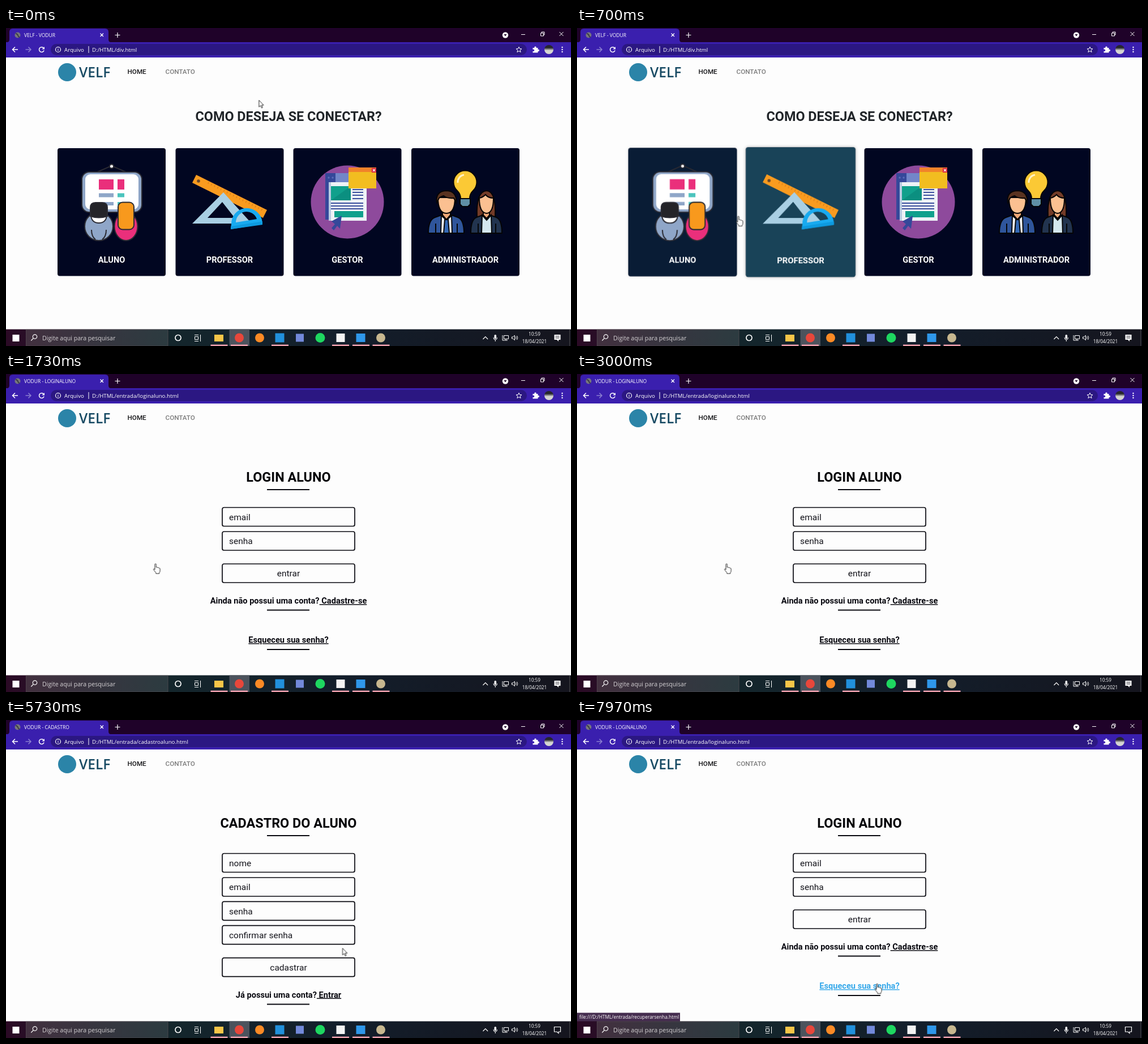
Write an HTML page that moves like this. It is 998 px wide and 561 px high and loops after 8000 ms.

```html
<!DOCTYPE html>
<html lang="pt-BR">
<head>
<meta charset="utf-8">
<title>Login</title>
<style>
html, body { margin: 0; width: 100%; height: 100%; overflow: hidden; background: #fdfdfd; }
svg { display: block; }
text { font-family: Roboto, sans-serif; white-space: pre; }
.ui text, .ui { font-family: "Open Sans", sans-serif; fill: #fff; }
.line { fill: none; stroke: #fff; stroke-width: 1.2; }
.mid { text-anchor: middle; }
.h { font-size: 23.4px; font-weight: 700; text-anchor: middle; fill: #050508; }
.label { font-size: 14.6px; font-weight: 700; text-anchor: middle; fill: #fff; }
.ask { font-size: 14.6px; font-weight: 700; text-anchor: middle; fill: #08080f; }
.in { font-size: 15.5px; fill: #15151c; }
.link { text-decoration: underline; }
.tab { font-size: 8.5px; }
.url { font-size: 9.7px; }
.status text { font-size: 8.4px; }

.home, .login, .signup, .badge, .quiet, .arrow, .hand { animation: 8s step-end infinite; }
.home { animation-name: home; }
.login { animation-name: login; }
.signup { animation-name: signup; }
.badge { animation-name: badge; }
.quiet { animation-name: quiet; }
.arrow { animation-name: arrow; }
.hand { animation-name: hand; }
@keyframes home { 0% { opacity: 1 } 21.25%, 100% { opacity: 0 } }
@keyframes login { 0% { opacity: 0 } 21.25% { opacity: 1 } 59% { opacity: 0 } 86%, 100% { opacity: 1 } }
@keyframes signup { 0% { opacity: 0 } 59% { opacity: 1 } 86%, 100% { opacity: 0 } }
@keyframes badge { 0% { opacity: 1 } 60%, 100% { opacity: 0 } }
@keyframes quiet { 0% { opacity: 0 } 60%, 100% { opacity: 1 } }
@keyframes arrow {
  0% { opacity: 1 } 3.1% { opacity: 0 } 7.7% { opacity: 1 } 8.5% { opacity: 0 }
  37.9% { opacity: 1 } 46% { opacity: 0 } 60% { opacity: 1 } 80.5% { opacity: 0 }
  88% { opacity: 1 } 94.4%, 100% { opacity: 0 }
}
@keyframes hand {
  0% { opacity: 0 } 3.1% { opacity: 1 } 7.7% { opacity: 0 } 8.5% { opacity: 1 }
  37.9% { opacity: 0 } 46% { opacity: 1 } 60% { opacity: 0 } 80.5% { opacity: 1 }
  88% { opacity: 0 } 94.4%, 100% { opacity: 1 }
}
.cursor { animation: move 8s linear infinite; }
@keyframes move {
  0% { transform: translate(447px, 127px) }
  3% { transform: translate(398px, 214px) }
  6.25% { transform: translate(334px, 320px) }
  8.5% { transform: translate(285px, 332px) }
  10.9%, 37.5% { transform: translate(261.5px, 335px); animation-timing-function: ease-in-out }
  47.5%, 71.6% { transform: translate(594.5px, 402.5px); animation-timing-function: ease-in-out }
  81.6%, 87.5% { transform: translate(571px, 482px); animation-timing-function: ease-in-out }
  93.6% { transform: translate(570px, 452px) }
  97.1%, 100% { transform: translate(527.5px, 465.5px) }
}

.card { transform-box: fill-box; transform-origin: center; }
.glow { fill: #5be0e4; opacity: 0; filter: drop-shadow(0 0 3px #100505); }
.teacher { animation: growTeacher 8s infinite; }
.teacher .glow { animation: glowTeacher 8s infinite; }
.student { animation: growStudent 8s infinite; }
.student .glow { animation: glowStudent 8s infinite; }
@keyframes growTeacher { 0%, 3.1% { transform: scale(1) } 5.6%, 7.7% { transform: scale(1.053) } 10.2%, 100% { transform: scale(1) } }
@keyframes glowTeacher { 0%, 3.1% { opacity: 0 } 5.6%, 7.7% { opacity: 1 } 10.2%, 100% { opacity: 0 } }
@keyframes growStudent { 0%, 8.5% { transform: scale(1) } 11%, 30% { transform: scale(1.053) } 30.1%, 100% { transform: scale(1) } }
@keyframes glowStudent { 0%, 8.5% { opacity: 0 } 11%, 30% { opacity: 1 } 30.1%, 100% { opacity: 0 } }

.join { animation: join 8s infinite; }
.forgot { animation: forgot 8s infinite; }
.enter { animation: enter 8s infinite; }
@keyframes join { 0%, 46% { fill: #08080f } 49%, 59% { fill: #35a8ea } 59.1%, 100% { fill: #08080f } }
@keyframes forgot { 0%, 94.4% { fill: #08080f } 97%, 99.99% { fill: #35a8ea } 100% { fill: #08080f } }
@keyframes enter { 0%, 80.5% { fill: #08080f } 83%, 86% { fill: #35a8ea } 86.1%, 100% { fill: #08080f } }

.status rect { fill: #20022b; }
.status { opacity: 0; animation: 8s linear infinite; }
.s1 { animation-name: s1; }
.s2 { animation-name: s2; }
.s3 { animation-name: s3; }
.s4 { animation-name: s4; }
@keyframes s1 { 0%, 10.5% { opacity: 0 } 11.5%, 21.2% { opacity: 1 } 21.25%, 100% { opacity: 0 } }
@keyframes s2 { 0%, 47.8% { opacity: 0 } 49.5%, 58.95% { opacity: 1 } 59%, 100% { opacity: 0 } }
@keyframes s3 { 0%, 83.2% { opacity: 0 } 84.5%, 85.95% { opacity: 1 } 86%, 100% { opacity: 0 } }
@keyframes s4 { 0%, 98.9% { opacity: 0 } 99.1% { opacity: .45 } 99.6%, 99.99% { opacity: .83 } 100% { opacity: 0 } }
</style>
</head>
<body>
<svg width="998" height="561" viewBox="0 0 998 561">
  <defs>
    <linearGradient id="bar">
      <stop offset="0" stop-color="#2b0a25"/><stop offset=".29" stop-color="#14262c"/>
      <stop offset=".6" stop-color="#131e2b"/><stop offset="1" stop-color="#15151e"/>
    </linearGradient>
    <linearGradient id="find"><stop offset="0" stop-color="#42303f"/><stop offset="1" stop-color="#2c3b40"/></linearGradient>
    <linearGradient id="photo" x2="0" y2="1"><stop offset=".3" stop-color="#26262c"/><stop offset=".6" stop-color="#d5d5d2"/></linearGradient>
    <rect id="field" x="382" width="234" height="33" rx="3" fill="none" stroke="#08080f" stroke-width="1.7"/>
    <rect id="rule" x="461" width="75" height="2" fill="#08080f"/>
    <rect id="panel" y="212" width="191" height="225.5" rx="4"/>
    <rect id="run" y="558.5" height="2.5" width="30" fill="#f0a0ae"/>
  </defs>
  <rect width="998" height="561" fill="#fdfdfd"/>

  <circle cx="108" cy="78" r="16" fill="#2b84a8"/>
  <text x="129" y="87" style="font:600 24.5px 'Open Sans',sans-serif" fill="#174a63">VELF</text>
  <g font-size="11.7" font-weight="500">
    <text x="214.5" y="81" fill="#17171a">HOME</text>
    <text x="281.5" y="81" fill="#7d7d7d">CONTATO</text>
  </g>

  <g class="home">
    <text class="h" x="499" y="164" style="fill:#212529">COMO DESEJA SE CONECTAR?</text>

    <g class="card student">
      <use href="#panel" x="91" fill="#010621"/><use href="#panel" x="91" class="glow"/>
      <g stroke="#2b2b33" stroke-width="2">
        <path d="M159 255L186.500 243L214 255" fill="none"/>
        <circle cx="186.500" cy="244" r="3.500" fill="#fff"/>
        <rect x="134" y="254" width="106" height="71" rx="13" fill="#8fa6c8"/>
        <rect x="140" y="258" width="94" height="62" rx="9" fill="#fff" stroke="none"/>
        <g stroke="none">
          <path d="M164 267h26v18h-26zM197 267h12v18h-12z" fill="#ea2f7b"/>
          <path d="M164 291.500h26v7h-26zM164 307h26v6h-26z" fill="#8fa6c8"/>
          <path d="M197 291.500h12v7h-12zM197 307h12v6h-12z" fill="#4bc4bd"/>
        </g>
        <ellipse cx="164" cy="350" rx="25" ry="25" fill="#8fa6c8"/>
        <path d="M150 330h28q-1 14-14 14t-14-14z" fill="#fff"/>
        <path d="M149 332v-15q0-9 9-9h12q9 0 9 9v15q-15 5-30 0z" fill="#242429"/>
        <path d="M151 356q0 12 7 17M177 356q0 12-7 17M201 356q0 12 6 17M225 356q0 12-6 17" fill="none"/>
        <ellipse cx="212" cy="350" rx="20.500" ry="25" fill="#ea2f7b"/>
        <rect x="198" y="307.500" width="28" height="48" rx="8" fill="#f8991d"/>
      </g>
      <text class="label" x="186.500" y="413.500">ALUNO</text>
    </g>

    <g class="card teacher">
      <use href="#panel" x="299.500" fill="#010621"/><use href="#panel" x="299.500" class="glow"/>
      <path d="M336 259L461 321L454 335L329 273z" fill="#f99b1f"/>
      <path d="M357 273L453 321" stroke="#dc7e18" stroke-width="4" stroke-dasharray="1.200 5"/>
      <circle cx="340" cy="270" r="2.800" fill="#6b4a2a"/>
      <path d="M384 290L434 345H329zM382 307L356 335H404z" fill="#a9cfe3" fill-rule="evenodd"/>
      <path d="M398 346A27.500 27.500 0 0 1 452 338L453 346L397 355zM406 343L443 337A19 19 0 0 0 406 343z" fill="#18aaf0" fill-rule="evenodd"/>
      <path d="M397 350L453 341V347L397 355z" fill="#0d9ae0"/>
      <text class="label" x="395" y="413.500">PROFESSOR</text>
    </g>

    <g>
      <use href="#panel" x="507.500" fill="#010621"/>
      <circle cx="603" cy="307" r="64.500" fill="#8e4a9c"/>
      <path d="M564 256h42v82h-42z" fill="#35489a"/>
      <path d="M582 256h40v16h-40z" fill="#7286c9"/>
      <path d="M570 272h67v68h-67z" fill="#eef2f6"/>
      <path d="M570 272h4v68h-4z" fill="#b9cbe2"/>
      <path d="M574 279h35v25h-35zM580 323h51v11h-51z" fill="#10a08c"/>
      <path d="M574 304l35-25v25z" fill="#0b8f80"/>
      <path d="M612 285h19m-19 5h19m-19 5h19m-19 6h19M574 309h57m-57 5h57m-57 5h57" stroke="#3b4f9e" stroke-width="2"/>
      <path d="M605 246h49v37h-49z" fill="#f2bd20"/>
      <path d="M605 246h49v8h-49z" fill="#f1832a"/>
      <path d="M646 247h8v8h-8z" fill="#d9263c"/>
      <path d="M648 249l4 4m0-4l-4 4" class="line"/>
      <path d="M593 331L590 354L585 349L579 357L575 353L581 346L575 341z" fill="#35489a"/>
      <circle cx="570" cy="264" r="1.700" fill="#5a6cb8"/><circle cx="577" cy="264" r="1.700" fill="#5a6cb8"/>
      <text class="label" x="603" y="413.500">GESTOR</text>
    </g>

    <g>
      <use href="#panel" x="716" fill="#010621"/>
      <g stroke="#050506" stroke-width="2">
        <path d="M803 301q0-8-6-14a20.500 20.500 0 1 1 28 0q-6 6-6 14z" fill="#fbc935"/>
        <path d="M802 301h18v10l-4 4h-10l-4-4z" fill="#5f8fa5"/>
        <path d="M798 273a13 13 0 0 1 11-14" fill="none" stroke="#fff2c4" stroke-width="3"/>
        <path d="M746 362q0-24 12-28l14-5h12l14 5q11 4 11 28z" fill="#2f559b"/>
        <path d="M769 331l9 8 9-8 1 31h-20z" fill="#f2f4f7"/>
        <path d="M775 338h6l2 24h-10z" fill="#3569b5"/>
        <path d="M771 321h14v9l-7 8-7-8z" fill="#efa978"/>
        <path d="M763 299q0 28 15 28t15-28z" fill="#fbc091"/>
        <path d="M761 308q-3-20 17-21 19 1 17 21l-4-8q-12 1-18-4-6 2-8 4z" fill="#5a3320"/>
        <path d="M832 334q-2-46 17-47 17 1 15 47z" fill="#743c28"/>
        <path d="M821 362q0-24 10-28l11-4h13l11 4q10 4 10 28z" fill="#22344f"/>
        <path d="M841 330l8 9 8-9 1 32h-18z" fill="#d5e8ef"/>
        <path d="M843 319h11v11l-5 6-6-6z" fill="#efa978"/>
        <path d="M836 300q0 26 13 27 12-1 12-27-9 0-14-6-5 5-11 6z" fill="#fbc091"/>
        <path d="M759 345v17m38-17v17m37-17v17m31-17v17" fill="none"/>
      </g>
      <text class="label" x="811.500" y="413.500">ADMINISTRADOR</text>
    </g>
  </g>

  <g class="login">
    <text class="h" x="499" y="190">LOGIN ALUNO</text>
    <use href="#rule" y="203"/><use href="#rule" y="415.500"/><use href="#rule" y="485"/>
    <use href="#field" y="235.500"/><use href="#field" y="278"/><use href="#field" y="335"/>
    <text class="in" x="394" y="258">email</text>
    <text class="in" x="394" y="300.300">senha</text>
    <text class="in mid" x="499" y="357.300">entrar</text>
    <text class="ask" x="499" y="405">Ainda não possui uma conta?<tspan class="link join"> Cadastre-se</tspan></text>
    <text class="ask" x="499" y="474"><tspan class="link forgot">Esqueceu sua senha?</tspan></text>
  </g>

  <g class="signup">
    <text class="h" x="499" y="190">CADASTRO DO ALUNO</text>
    <use href="#rule" y="203"/><use href="#rule" y="500.500"/>
    <use href="#field" y="235.500"/><use href="#field" y="278"/><use href="#field" y="320.300"/>
    <use href="#field" y="362.700"/><use href="#field" y="419.700"/>
    <text class="in" x="394" y="258">nome</text>
    <text class="in" x="394" y="300.300">email</text>
    <text class="in" x="394" y="342.700">senha</text>
    <text class="in" x="394" y="385">confirmar senha</text>
    <text class="in mid" x="499" y="442">cadastrar</text>
    <text class="ask" x="499" y="489.500">Já possui uma conta?<tspan class="link enter"> Entrar</tspan></text>
  </g>

  <!-- browser frame -->
  <g class="ui">
    <rect width="998" height="26" fill="#1f0229"/>
    <path d="M0 25h998v27H0zM2 25q4 0 4-5V7q0-6 6-6h163q6 0 6 6v13q0 5 4 5z" fill="#3a1fae"/>
    <rect x="79" y="28" width="841" height="20" rx="10" fill="#2b1782"/>
    <circle cx="20.500" cy="12.500" r="5" fill="#77777f"/>
    <path d="M17 10q3 0 4 3t3 3" fill="none" stroke="#3d3d45" stroke-width="2"/>
    <g class="line">
      <path d="M166.500 9.500l5.500 5.500m0-5.500l-5.500 5.500M192.500 12.500h9m-4.500-4.500v9"/>
      <path d="M910 11.500h7M944.500 9h5v5h-5zM946 9v-2h5v5h-1.500M977.500 7l7 7m0-7l-7 7" stroke-width="1"/>
      <path d="M21 38H11.500m4.500-4.500L11.500 38l4.500 4.500" stroke-width="1.500"/>
      <path d="M34.500 38H44m-4.500-4.500L44 38l-4.500 4.500" stroke="#8b7fd0" stroke-width="1.500"/>
      <path d="M66.500 35.500a4.400 4.400 0 1 0 .6 4" stroke-width="1.500"/>
      <circle cx="92" cy="38" r="4.500"/><path d="M92 37v3.500m0-5.500v1M146 32v12" stroke-width="1"/>
      <path d="M906 33.300l1.400 3.200 3.500.3-2.700 2.300.9 3.500-3.100-1.900-3.100 1.900.9-3.500-2.700-2.300 3.500-.3z" stroke-width="1"/>
    </g>
    <path d="M68 33v4.500h-4.500z"/>
    <circle cx="882" cy="12.500" r="5.200"/><path d="M879.500 11h5l-2.500 3.500z" fill="#1f0229"/>
    <path d="M930.500 35h3a1.700 1.700 0 1 1 3 0h3v3a1.700 1.700 0 1 1 0 3v2.500h-9v-2.800a1.700 1.700 0 1 0 0-2.700z"/>
    <circle cx="959" cy="38" r="8" fill="url(#photo)"/>
    <circle cx="982.500" cy="34" r="1.200"/><circle cx="982.500" cy="38" r="1.200"/><circle cx="982.500" cy="42" r="1.200"/>
    <text class="url" x="103" y="41.500">Arquivo</text>
    <g class="home"><text class="tab" x="32" y="15.500">VELF - VODUR</text><text class="url" x="152" y="41.500">D:/HTML/div.html</text></g>
    <g class="login"><text class="tab" x="32" y="15.500">VODUR - LOGINALUNO</text><text class="url" x="152" y="41.500">D:/HTML/entrada/loginaluno.html</text></g>
    <g class="signup"><text class="tab" x="32" y="15.500">VODUR - CADASTRO</text><text class="url" x="152" y="41.500">D:/HTML/entrada/cadastroaluno.html</text></g>

    <g class="status s1"><rect y="516.500" width="164" height="16"/><text x="4" y="527">file:///D:/HTML/entrada/loginaluno.html</text></g>
    <g class="status s2"><rect y="516.500" width="177" height="16"/><text x="4" y="527">file:///D:/HTML/entrada/cadastroaluno.html</text></g>
    <g class="status s3"><rect y="516.500" width="164" height="16"/><text x="4" y="527">file:///D:/HTML/entrada/loginaluno.html</text></g>
    <g class="status s4"><rect y="516.500" width="182" height="16"/><text x="4" y="527">file:///D:/HTML/entrada/recuperarsenha.html</text></g>
  </g>

  <!-- taskbar -->
  <g class="ui">
    <rect y="531.500" width="998" height="29.500" fill="url(#bar)"/>
    <rect x="35.500" y="532" width="250.500" height="29" fill="url(#find)" stroke="#5b5258" stroke-width=".7"/>
    <rect x="394.500" y="531.500" width="35.500" height="29.500" fill="#4c535d"/>
    <rect x="11.500" y="541" width="12" height="12"/>
    <g class="line">
      <circle cx="51" cy="544.500" r="3.700"/><path d="M48.300 547.300l-4 4.200"/>
      <circle cx="304" cy="546.500" r="5" stroke-width="1.700"/>
      <path d="M333.500 544.500h6v5h-6zM333 541.500h7M333 552.500h7M343.500 541v12" stroke-width="1"/>
      <path d="M842.500 549l4.300-4.300 4.300 4.300"/>
      <path d="M861 546q0 4 3.300 4t3.300-4m-3.300 4v3" stroke-width="1"/>
      <path d="M879.500 542.500h8v6h-8zM877 542v9h9m-3-2v2" stroke-width="1"/>
      <path d="M893.500 545h2l3-2.700v8.400l-3-2.700h-2zM900.500 544.500q1.500 2 0 4M902.500 543q2.500 3.500 0 7" stroke-width="1"/>
      <path d="M995.500 532v29" stroke="#666" stroke-width=".6"/>
    </g>
    <rect x="862.500" y="541" width="3.600" height="7.500" rx="1.800"/>
    <text x="64" y="550.500" font-size="10.600" style="fill:#d6d3d5">Digite aqui para pesquisar</text>
    <rect x="368" y="541" width="16" height="12" fill="#f7c548"/>
    <circle cx="412" cy="546.500" r="8" fill="#e8473b"/>
    <circle cx="448" cy="546.500" r="8" fill="#fb8a25"/>
    <rect x="475.500" y="538.500" width="16" height="16" fill="#2190dc"/>
    <rect x="512" y="539.500" width="14" height="14" fill="#7289da"/>
    <circle cx="555" cy="546.500" r="8.500" fill="#1ed760"/>
    <rect x="583.500" y="539" width="15" height="15" fill="#f3f3f3"/>
    <rect x="618.500" y="539" width="16" height="15" fill="#2f97ea"/>
    <circle cx="662" cy="546.500" r="8" fill="#c7b78f"/>
    <use href="#run" x="361.500"/><use href="#run" x="397"/><use href="#run" x="469"/>
    <use href="#run" x="576"/><use href="#run" x="612"/><use href="#run" x="647.500"/>
    <g class="mid" font-size="8.200"><text x="933.500" y="542.500">10:59</text><text x="933.500" y="555.500">18/04/2021</text></g>
    <path class="badge" d="M968.500 541h11v9h-3.500v3l-3-3h-4.500z"/>
    <path class="badge" d="M970.500 543.800h7m-7 3h7" stroke="#15151e"/>
    <path class="line quiet" d="M968.500 541.500h11v8.500h-3.500v2.700l-3-2.700h-4.500z"/>
  </g>

  <g class="cursor" fill="#fff" stroke="#111" stroke-width=".9" stroke-linejoin="round">
    <path class="arrow" d="M0 0V12L2.800 9.500L4.700 13.700L6.500 12.900L4.700 8.800H8.300z"/>
    <path class="hand" d="M1.400 1.200q0-1.400 1.200-1.400t1.200 1.400V6q2-.8 2.400.6 2-.6 2.400.7 2-.2 2 1.400v3.600q0 2-1.400 3.300v1.500H3.300v-1.500L-.7 10.500q-.8-1.500.5-1.800l1.600 1.300z"/>
  </g>
</svg>
</body>
</html>
```
